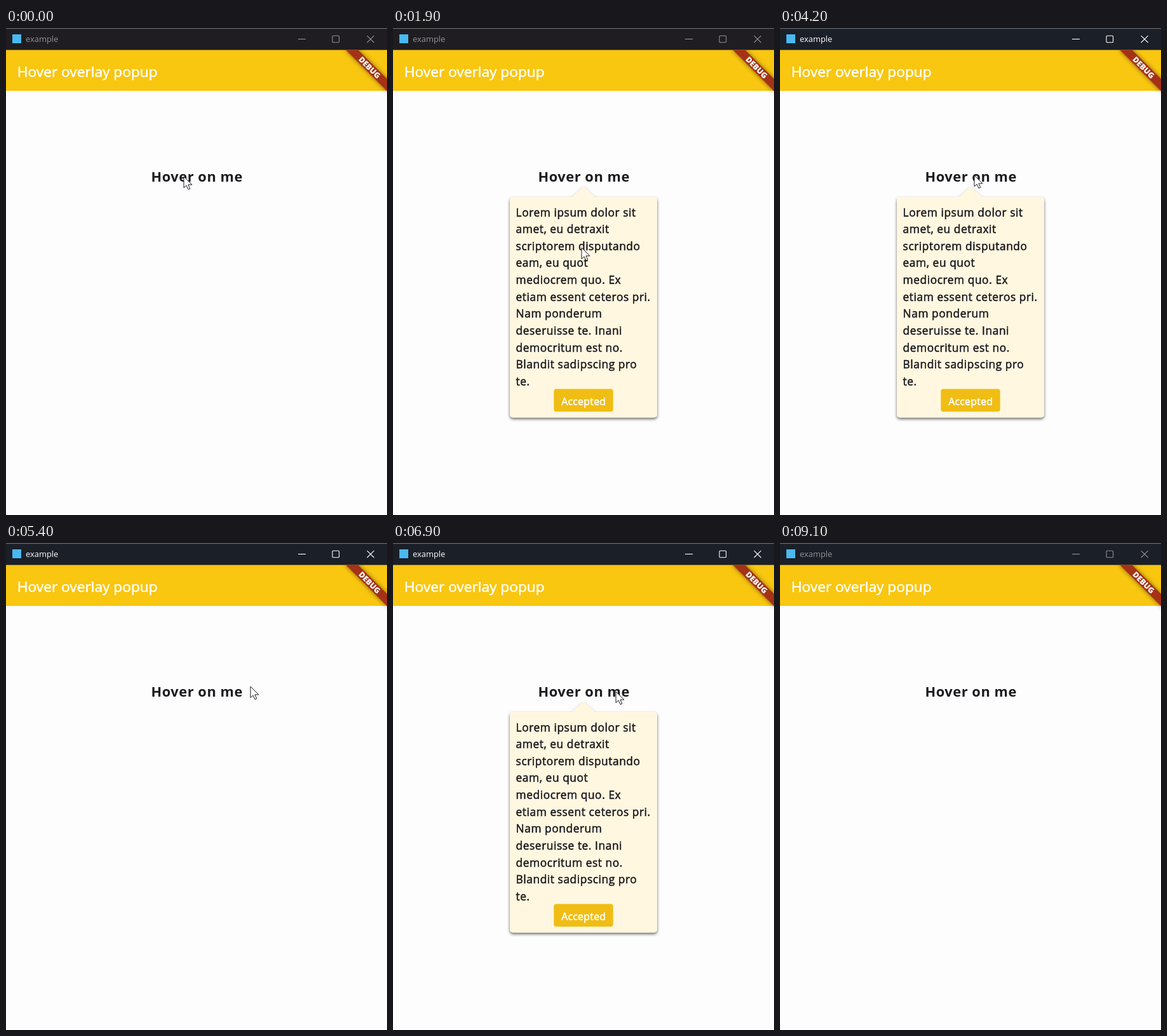
An HTML page that plays this animation: 600 px wide and 767 px high, repeating every 9200 ms.

```html
<!DOCTYPE html>
<html lang="en">
<head>
<meta charset="utf-8">
<title>Hover overlay popup</title>
<style>
  html, body { margin: 0; width: 100%; height: 100%; overflow: hidden; background: #fefdfe; }
  svg { display: block; width: 600px; height: 767px; }
  text { font-family: "Open Sans", "Noto Sans", sans-serif; white-space: pre; }
  .medium { stroke-width: .55px; stroke-linejoin: round; }
  .light { fill: #fff; stroke: #fff; }
  .dark { fill: #1c1b1f; stroke: #1c1b1f; }
  #frame { fill: #1f1d21; color: #929194; }
  #frame.cool { fill: #1b1f28; }
  #frame.active { color: #fff; }
  #caption { fill: currentColor; font-size: 12.9px; }
  #controls { fill: none; stroke: currentColor; stroke-width: 1.1; }
  #body { font-size: 17.3px; letter-spacing: .58px; }
</style>
</head>
<body>
<svg viewBox="0 0 600 767">
  <defs>
    <clipPath id="page"><rect y="34.6" width="600" height="733"/></clipPath>
    <filter id="cardShadow" x="-10%" y="-10%" width="120%" height="120%">
      <feDropShadow dx="0" dy="2.4" stdDeviation="2.3" flood-color="#000" flood-opacity=".6"/>
    </filter>
    <filter id="bandShadow" x="-20%" y="-150%" width="140%" height="400%">
      <feDropShadow dx="0" dy="0" stdDeviation="3.6" flood-color="#000" flood-opacity=".5"/>
    </filter>
  </defs>

  <rect width="600" height="767" fill="#fefdfe"/>

  <g id="frame">
    <rect width="600" height="35"/>
    <rect width="600" height="1.2" fill="#69696c"/>
    <rect x="10" y="10" width="14" height="14" fill="#49b9f0"/>
    <text id="caption" x="31" y="22.3">example</text>
    <g id="controls">
      <path d="M460 17.5H472"/>
      <rect x="514" y="12.2" width="10.6" height="10.6" rx="1.4"/>
      <path d="M568.6 12.2L579.6 23M579.6 12.2L568.6 23"/>
    </g>
  </g>

  <rect y="34.6" width="600" height="64.4" fill="#f9c610"/>
  <text class="medium light" x="17.8" y="77.2" font-size="22.7">Hover overlay popup</text>

  <g clip-path="url(#page)">
    <g transform="translate(600 34.8) rotate(45)">
      <rect x="-46" y="32" width="92" height="13.7" fill="#a43117" filter="url(#bandShadow)"/>
      <text x="0" y="43.2" fill="#fff" font-size="12.3" font-weight="800" text-anchor="middle">DEBUG</text>
    </g>
  </g>

  <text x="228.5" y="242" fill="#1c1b1f" font-size="21.8" font-weight="700" letter-spacing=".55">Hover on me</text>

  <g id="popup" visibility="hidden">
    <path fill="#fff7e0" filter="url(#cardShadow)"
      d="M189 266H282L300 249.5L318 266H411a5 5 0 0 1 5 5V608.5a5 5 0 0 1-5 5H189a5 5 0 0 1-5-5V271a5 5 0 0 1 5-5Z"/>
    <g id="body" class="medium dark"></g>
    <rect x="253.3" y="568.5" width="93.4" height="35.8" rx="4" fill="#f0bd14"/>
    <text class="medium light" x="265.2" y="594.2" font-size="15.8" letter-spacing=".3">Accepted</text>
  </g>

  <path id="cursor" d="M0 0V17.6L4 13.9L7 20.3L9.8 19.1L6.9 12.9H13Z"
    fill="#fff" stroke="#1a1a1f" stroke-width="1" stroke-linejoin="round"/>
</svg>
<script>
const LOOP = 9200, STEP = 100;
const $ = id => document.getElementById(id);

const lines = [
  'Lorem ipsum dolor sit', 'amet, eu detraxit', 'scriptorem disputando', 'eam, eu quot',
  'mediocrem quo. Ex', 'etiam essent ceteros pri.', 'Nam ponderum', 'deseruisse te. Inani',
  'democritum est no.', 'Blandit sadipscing pro', 'te.'
];
lines.forEach((line, i) => {
  const row = document.createElementNS('http://www.w3.org/2000/svg', 'text');
  row.setAttribute('x', 193.6);
  row.setAttribute('y', 296.6 + i * 26.62);
  row.textContent = line;
  $('body').append(row);
});

// time, x, y of the pointer tip
const path = [
  [0, 280, 234], [900, 284, 238], [1500, 292, 290], [1900, 297, 346], [2300, 302, 585],
  [2800, 302, 585], [3500, 306, 244], [3900, 306, 232], [4400, 306, 232], [4900, 325, 235],
  [5400, 385, 226], [5900, 464, 213], [6200, 464, 213], [6700, 360, 232], [7300, 324, 238],
  [8100, 324, 238], [8900, 350, -30], [9200, 350, -30]
];
const shown = [[300, 2400], [3500, 5400], [6700, 8300]];
const focused = [[2300, 9100]];
const cooled = [[2300, LOOP]];

const within = (spans, t) => spans.some(([a, b]) => t >= a && t < b);
const smooth = k => k * k * (3 - 2 * k);

function pointer(t) {
  const i = path.findIndex(p => p[0] > t);
  const [t0, x0, y0] = path[i - 1], [t1, x1, y1] = path[i];
  const k = smooth((t - t0) / (t1 - t0));
  return [x0 + (x1 - x0) * k, y0 + (y1 - y0) * k];
}

function draw(now) {
  const t = Math.floor((now % LOOP) / STEP) * STEP;
  const [x, y] = pointer(t).map(Math.round);
  $('cursor').setAttribute('transform', `translate(${x} ${y})`);
  $('popup').setAttribute('visibility', within(shown, t) ? 'visible' : 'hidden');
  $('frame').classList.toggle('active', within(focused, t));
  $('frame').classList.toggle('cool', within(cooled, t));
}

const start = performance.now();
function tick() {
  draw(performance.now() - start);
  requestAnimationFrame(tick);
}
tick();
</script>
</body>
</html>
```
